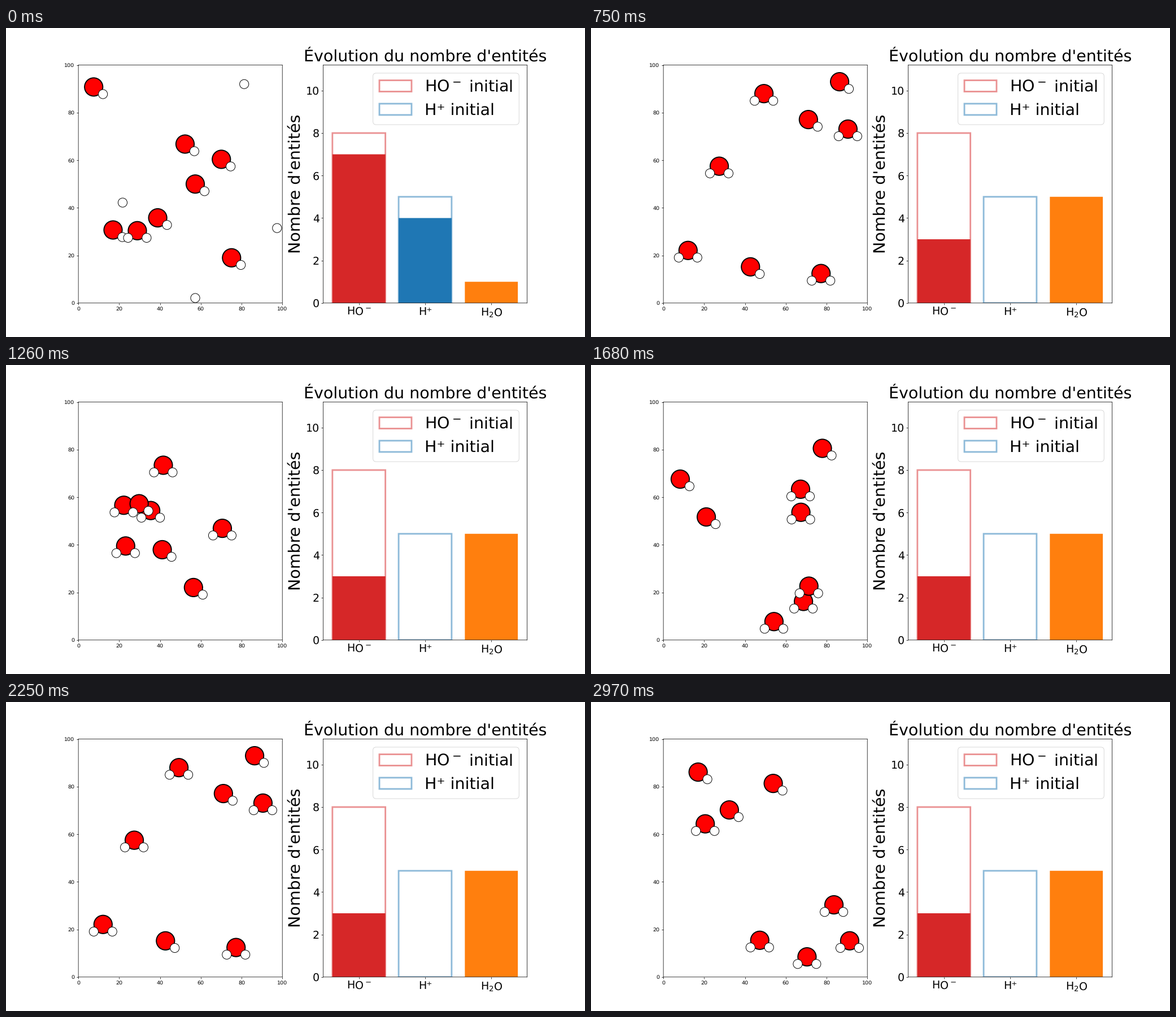
A matplotlib script for the animation above (3 s loop, 1025x547 px).

```python
import numpy as np
import matplotlib.pyplot as plt
from matplotlib.animation import FuncAnimation
from matplotlib.collections import EllipseCollection

plt.rcParams.update({"text.hinting": "none", "path.snap": False})

W, H, DPI = 1025, 547, 1025 / 15
FRAMES, INTERVAL = 100, 30
HO_START, H_START = 8, 5
LOW, HIGH = 7, 93
H_OFFSET = np.array([4.55, -3.0])

# Two key poses of the oxygens; the first five end up as water.
START = np.array([(28.9, 30.4), (70.1, 60.4), (57.3, 50), (7.5, 90.8),
                  (52.3, 66.8), (17, 30.7), (75.1, 19), (38.9, 35.8)])
MEET = np.array([(12.1, 22.1), (90.5, 73.1), (77.3, 12.4), (27.4, 57.5),
                 (49.3, 88), (42.7, 15.2), (71.1, 77.1), (86.4, 93)])
MEET_AT, PERIOD = 25, 50

# Free protons join their oxygens one after the other.
PROTONS = np.array([(24.35, 27.4), (81.3, 92), (97.4, 31.5),
                    (21.7, 42.2), (57.3, 2.1)])
CAPTURE = np.linspace(0, 14, H_START)

# Whole numbers of wall-to-wall trips bring everyone back each period.
rng = np.random.default_rng(4)
trips = rng.choice([-2, -1, 1, 2], size=MEET.shape)
velocity = 2 * (HIGH - LOW) * trips / PERIOD


def bounce(pos):
    span = HIGH - LOW
    return HIGH - np.abs((pos - LOW) % (2 * span) - span)


def oxygens(t):
    if t < MEET_AT:
        return START + (MEET - START) * t / MEET_AT
    return bounce(MEET + velocity * (t - MEET_AT))


def left_site(pos):
    return pos + H_OFFSET * (-1, 1)


TARGETS = np.array([left_site(oxygens(t)[m]) for m, t in enumerate(CAPTURE)])


def protons(t, oxy):
    frac = (t / np.maximum(CAPTURE, 1))[:, None]
    free = PROTONS + (TARGETS - PROTONS) * frac
    bound = (CAPTURE <= t)[:, None]
    return np.where(bound, left_site(oxy[:H_START]), free)


fig, (box, chart) = plt.subplots(
    1, 2, figsize=((W + 1e-6) / DPI, (H + 1e-6) / DPI), dpi=DPI)

box.set(xlim=(0, 100), ylim=(0, 100))


def balls(count, color, size, edge, z):
    sizes = [size] * count
    dots = EllipseCollection(
        sizes, sizes, [0] * count, units="points", facecolors=color,
        edgecolors="black", linewidths=edge, zorder=z,
        offsets=np.zeros((count, 2)), offset_transform=box.transData)
    return box.add_collection(dots, autolim=False)


oxy_dots = balls(HO_START, "red", 34, 2, 3)
own_dots = balls(HO_START, "white", 17, 1, 4)
free_dots = balls(H_START, "white", 17, 1, 5)

MINUS = r"$^{\hspace{0.2}{-}\hspace{0.2}}$"
NAMES = ["HO" + MINUS, "H⁺", "H$_2$O"]
COLORS = ["tab:red", "tab:blue", "tab:orange"]

for k, count in enumerate((HO_START, H_START)):
    chart.bar(k, count, fill=False, edgecolor=COLORS[k], lw=3, alpha=0.5,
              label=NAMES[k] + " initial")
bars = chart.bar(range(3), [0, 0, 0], color=COLORS)
chart.set(xlim=(-0.54, 2.54), ylim=(0, 1.4 * HO_START))
chart.set_xticks(range(3), NAMES)
chart.set_yticks(range(0, 11, 2))
chart.tick_params(labelsize=20)
chart.set_title("Évolution du nombre d'entités", fontsize=30)
chart.set_ylabel("Nombre d'entités", fontsize=30)
chart.legend(fontsize=30, loc="upper right")


def update(t):
    oxy = oxygens(t)
    oxy_dots.set_offsets(oxy)
    own_dots.set_offsets(oxy + H_OFFSET)
    free_dots.set_offsets(protons(t, oxy))
    water = int((CAPTURE <= t).sum())
    for bar, n in zip(bars, (HO_START - water, H_START - water, water)):
        bar.set_height(n)
    return [oxy_dots, own_dots, free_dots, *bars]


anim = FuncAnimation(fig, update, frames=FRAMES, interval=INTERVAL,
                     repeat=True, repeat_delay=0)
plt.show()
```
